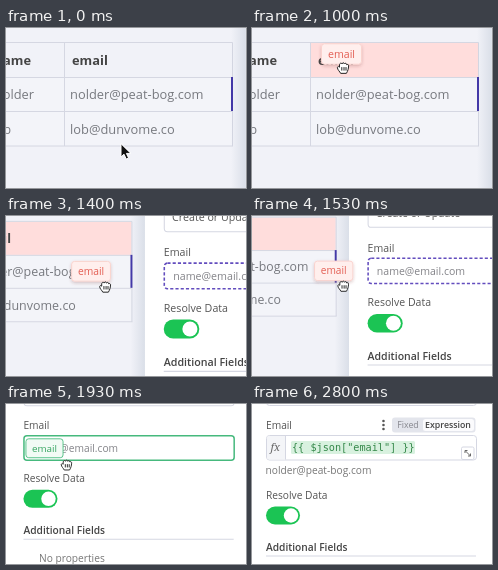
Animation, 240 px wide and 160 px high, one loop 3.33 s. Source, as an HTML page:

```html
<!DOCTYPE html>
<html lang="en">
<head>
<meta charset="utf-8">
<title>Drag a column into a field</title>
<style>
html, body { margin: 0; width: 100%; height: 100%; overflow: hidden; background: #f1f2f8; }
svg { display: block; width: 100%; height: 100%; }
text { font: 10.2px "Open Sans", sans-serif; fill: #555; white-space: pre; }
.cell { font-size: 12.85px; fill: #77797f; }
.head { font-size: 12.85px; font-weight: 700; fill: #444; }
.mode { font-size: 8.8px; text-anchor: middle; }
.soft { fill: #777; }
.code { font-family: "DejaVu Sans Mono", monospace; fill: #35884a; }
.fx { font: italic 11px "Noto Serif", serif; fill: #666; }
.line { fill: none; stroke: #d5d7e2; }
#chipText { font-size: 10.6px; text-anchor: middle; }
</style>
</head>
<body>
<svg viewBox="0 0 240 160">
  <defs>
    <linearGradient id="shade">
      <stop offset="0" stop-color="#68809a" stop-opacity="0"/>
      <stop offset="1" stop-color="#68809a" stop-opacity=".17"/>
    </linearGradient>
    <filter id="lift" x="-30%" y="-40%" width="160%" height="200%">
      <feDropShadow dx="0" dy="1.5" stdDeviation="1.5" flood-color="#733" flood-opacity=".25"/>
    </filter>
    <g id="expand" fill="none" stroke="#666">
      <path d="M3.5 6V3.5H6M9 6.5V9H6.5M3.8 3.8L8.7 8.7"/>
    </g>
  </defs>
  <rect width="240" height="160" fill="#f1f2f8"/>
  <g id="world">
    <g id="table">
      <rect x="-60" y="49" width="286" height="69" fill="#f3f4f9"/>
      <rect id="header" x="59" y="15" width="167" height="34"/>
      <path class="line" d="M-60 14.5H226.5V118M-60 49.5H226M-60 83.5H226M-60 118H227M58.5 14V118"/>
      <rect x="225" y="49" width="2" height="34" fill="#4338a8"/>
      <text class="head" x="25" y="36.5" text-anchor="end">name</text>
      <text class="head" x="66" y="36.5">email</text>
      <text class="cell" x="28" y="71" text-anchor="end">nolder</text>
      <text class="cell" x="5" y="105.5" text-anchor="end">b</text>
      <text class="cell" x="64" y="71">nolder@peat-bog.com</text>
      <text class="cell" x="64" y="105.5">lob@dunvome.co</text>
      <g id="grip" fill="#444"></g>
    </g>
    <rect x="225" y="-20" width="15" height="260" fill="url(#shade)"/>
    <g id="panel">
      <rect x="-4" y="-60" width="270" height="290" fill="#fff"/>
      <rect class="line" x="14.5" y="-26.5" width="210" height="28" rx="3"/>
      <text x="22" y="-8.5">Create or Update</text>
      <text x="14" y="25">Email</text>

      <g id="modes">
        <g fill="#555"><circle cx="131.5" cy="17" r="1.3"/><circle cx="131.5" cy="21" r="1.3"/><circle cx="131.5" cy="25" r="1.3"/></g>
        <rect x="140" y="13.5" width="83.5" height="15" rx="3" fill="#e3e5ec"/>
        <rect id="pill" y="15" height="12" rx="2.5" fill="#fbfbfd"/>
        <text id="fixed" class="mode" x="156" y="24">Fixed</text>
        <text id="expr" class="mode" x="196" y="24">Expression</text>
      </g>

      <rect id="field" x="14.5" y="31.5" height="24.5" rx="3" fill="#fff"/>
      <text id="hint" x="23" y="47.5" style="fill:#838388">name@email.com</text>

      <g id="alert">
        <rect x="193.5" y="43" width="12.5" height="12.5" rx="1.5" fill="#fff" stroke="#e0605c"/>
        <use href="#expand" x="193.5" y="43"/>
        <path d="M217 38.5L222.7 48.5H211.3Z" fill="#ec6c69" stroke="#ec6c69" stroke-width="1.6" stroke-linejoin="round"/>
        <path d="M217 41.5V45M217 46.6V47.9" stroke="#fff" stroke-width="1.3"/>
      </g>

      <g id="formula">
        <path d="M17 32H33V55.5H17Q15 55.5 15 53.5V34Q15 32 17 32" fill="#f4f5f8"/>
        <path class="line" d="M33.5 32V55.5"/>
        <text class="fx" x="18.5" y="47">fx</text>
        <rect x="39" y="37" width="124" height="13" rx="1.5" fill="#d8f1df"/>
        <text class="code" x="40" y="47">{{ $json["email"] }}</text>
        <rect class="line" x="209.5" y="43" width="12.5" height="12.5" rx="1.5" fill="#fff"/>
        <use href="#expand" x="209.5" y="43"/>
      </g>

      <text id="result" class="soft" x="13.5" y="70.5">nolder@peat-bog.com</text>
      <g id="lower">
        <text x="14" y="78">Resolve Data</text>
        <rect x="14" y="85.5" width="34" height="18" rx="9" fill="#1bc454"/>
        <circle cx="39" cy="94.5" r="7.2" fill="#fff"/>
        <text x="14" y="130" style="font-weight:600;fill:#444">Additional Fields</text>
        <path class="line" d="M14 135H224"/>
        <text class="soft" x="29.5" y="158">No properties</text>
      </g>
    </g>

    <g id="chip">
      <rect id="chipBox" x="-20" y="-10.2" width="40" height="20.4" rx="3"/>
      <text id="chipText" y="3.5">email</text>
    </g>
    <g id="cursor" stroke-linejoin="round" stroke-linecap="round">
      <path id="arrow" d="M0 0V13L3 10.2L5.2 15L7.6 14L5.4 9.4H9.6Z" fill="#111" stroke="#fff"/>
      <path id="open" d="M-2.5 7C-3 4.5-6.5 2.5-6.5 0C-6.3-1.4-4.6-1-3.4 .8L-4.8-3.6C-5-5.2-3.2-5.6-2.6-4.1L-1.9-2L-2-5.5C-1.9-7 0-7 .2-5.5L.5-2L1.2-5C1.7-6.5 3.4-6 3.2-4.5L2.8-1.5L4.2-3.4C5.2-4.4 6.5-3.5 6-2.2C5 1.5 5.2 4 3.8 7ZM-1.4 1V4.2M.9 1V4.2M3 1V4.2" fill="#fff" stroke="#222"/>
      <path id="grab" d="M-2.5 6C-3 4.7-5.6 2.8-5.6 .6C-5.4-.6-4.4-.8-3.5 .2V-2.3C-3.2-4.3-1.2-4.2-1-3C-.5-4.8 1.2-4.5 1.4-3C2-4.2 3.6-3.8 3.7-2.3C4.6-3 5.8-2.2 5.6-1C5.4 2 5 3.5 3.6 6ZM-1.2 .5V3.2M1 .5V3.2M3 .5V3.2" fill="#fff" stroke="#222"/>
      <g id="beam" fill="none">
        <path d="M-2.5-7Q0-7 0-5V5Q0 7-2.5 7M2.5-7Q0-7 0-5V5Q0 7 2.5 7M-1.5 2H1.5" stroke="#fff" stroke-width="2.6"/>
        <path d="M-2.5-7Q0-7 0-5V5Q0 7-2.5 7M2.5-7Q0-7 0-5V5Q0 7 2.5 7M-1.5 2H1.5" stroke="#222" stroke-width="1.1"/>
      </g>
    </g>
  </g>
</svg>
<script>
const LOOP = 3330, STEP = 66.6;
const $ = id => document.getElementById(id);
const set = (id, attrs) => { for (const k in attrs) $(id).setAttribute(k, attrs[k]); };
const show = (id, on) => { $(id).style.display = on ? "" : "none"; };
const move = (id, [x, y], scale = 1) =>
  set(id, { transform: `translate(${x.toFixed(2)} ${y.toFixed(2)}) scale(${scale.toFixed(4)})` });
const clamp = v => Math.min(1, Math.max(0, v));
const mix = (a, b, p) => `rgb(${a.map((v, i) => Math.round(v + (b[i] - v) * p))})`;

const PURPLE = [99, 77, 190], GREEN = [69, 190, 122], GREY = [213, 215, 226];

// Smooth path through [time, x, y] keys, at rest on both ends
function track(keys, t) {
  const last = keys.length - 1;
  if (t <= keys[0][0]) return keys[0].slice(1);
  if (t >= keys[last][0]) return keys[last].slice(1);
  const i = keys.findIndex(k => k[0] > t) - 1;
  const a = keys[i], b = keys[i + 1], d = b[0] - a[0], u = (t - a[0]) / d;
  const slope = (j, c) => j === 0 || j === last ? 0 :
    (keys[j + 1][c] - keys[j - 1][c]) / (keys[j + 1][0] - keys[j - 1][0]);
  return [1, 2].map(c => {
    const h = u * u * (3 - 2 * u);
    return a[c] + (b[c] - a[c]) * h
      + d * slope(i, c) * u * (1 - u) ** 2
      - d * slope(i + 1, c) * u * u * (1 - u);
  });
}

// The camera zooms out slightly in step with its sideways pan
const END = [-226.4, -21.8], END_ZOOM = 0.927;
const zoomAt = x => 1 + (END_ZOOM - 1) * x / END[0];
const camera = [[1000, 0, 0], [1400, -94.1, -8.7], [1730, -188.7, -18.9], [2000, ...END]];
const approach = [[0, 115, 116], [600, 90, 36]];
const drag = [[1000, 91, 39], [1400, 199.2, 81.2], [1730, 279.2, 86.2], [2000, 307.9, 88.2]];
const carried = [[1000, 89.5, 26], [1400, 184.7, 66], [1730, 264, 71]];
const DOCKED = [282, 71];

// The panel is laid out in screen units of the resting view
move("panel", END.map(v => -v / END_ZOOM), 1 / END_ZOOM);
for (let i = 0; i < 6; i++) {
  $("grip").innerHTML += `<rect x="${211 + i % 2 * 4.6}" y="${26.5 + (i >> 1) * 4.3}" width="3" height="3" rx=".8"/>`;
}

function draw(t) {
  const dragging = t >= 990, released = t >= 2390, filled = t >= 2455, resolved = t >= 2590;
  const pos = dragging ? track(drag, t) : track(approach, t);
  const hover = !dragging && pos[1] < 49;
  const snapped = dragging && pos[0] > 260;

  const view = track(camera, t);
  move("world", view, zoomAt(view[0]));
  set("header", { fill: dragging ? "#ffdddc" : hover ? "#d9dbe8" : "#f1f2f8" });
  show("grip", hover);

  move("cursor", pos);
  show("arrow", !dragging && !hover);
  show("open", hover);
  show("grab", dragging && !released);
  show("beam", released && !resolved);

  show("chip", dragging && !filled);
  move("chip", snapped ? DOCKED : track(carried, t));
  set("chipBox", {
    fill: snapped ? "#f2fbf5" : "#ffefed",
    stroke: snapped ? "#52c285" : "#fad3ce",
    filter: snapped ? "none" : "url(#lift)"
  });
  $("chipText").style.fill = snapped ? "#36a561" : "#e35f54";

  const edge = filled ? mix(GREEN, GREY, clamp((t - 2400) / 260))
    : dragging ? mix(PURPLE, GREEN, clamp((t - 1740) / 200)) : mix(GREY, GREY, 0);
  set("field", {
    width: released && !filled ? 191.5 : 210,
    stroke: edge,
    "stroke-width": dragging && !filled ? 1.5 : 1,
    "stroke-dasharray": dragging && !snapped ? "3 2" : "none"
  });
  show("hint", !filled);
  show("alert", released && !filled);
  show("formula", filled);

  show("modes", released);
  set("pill", filled ? { x: 171, width: 51 } : { x: 141.5, width: 29 });
  for (const [id, on] of [["fixed", !filled], ["expr", filled]]) {
    $(id).style.fontWeight = on ? 600 : 400;
    $(id).style.fill = on ? "#444" : "#85868d";
  }

  show("result", resolved);
  move("lower", [0, resolved ? 17 : 0]);
}

const start = performance.now();
function tick() {
  const t = (performance.now() - start) % LOOP;
  draw(Math.floor(t / STEP + 0.05) % 50 * STEP);
  requestAnimationFrame(tick);
}
draw(0);
requestAnimationFrame(tick);
</script>
</body>
</html>
```
